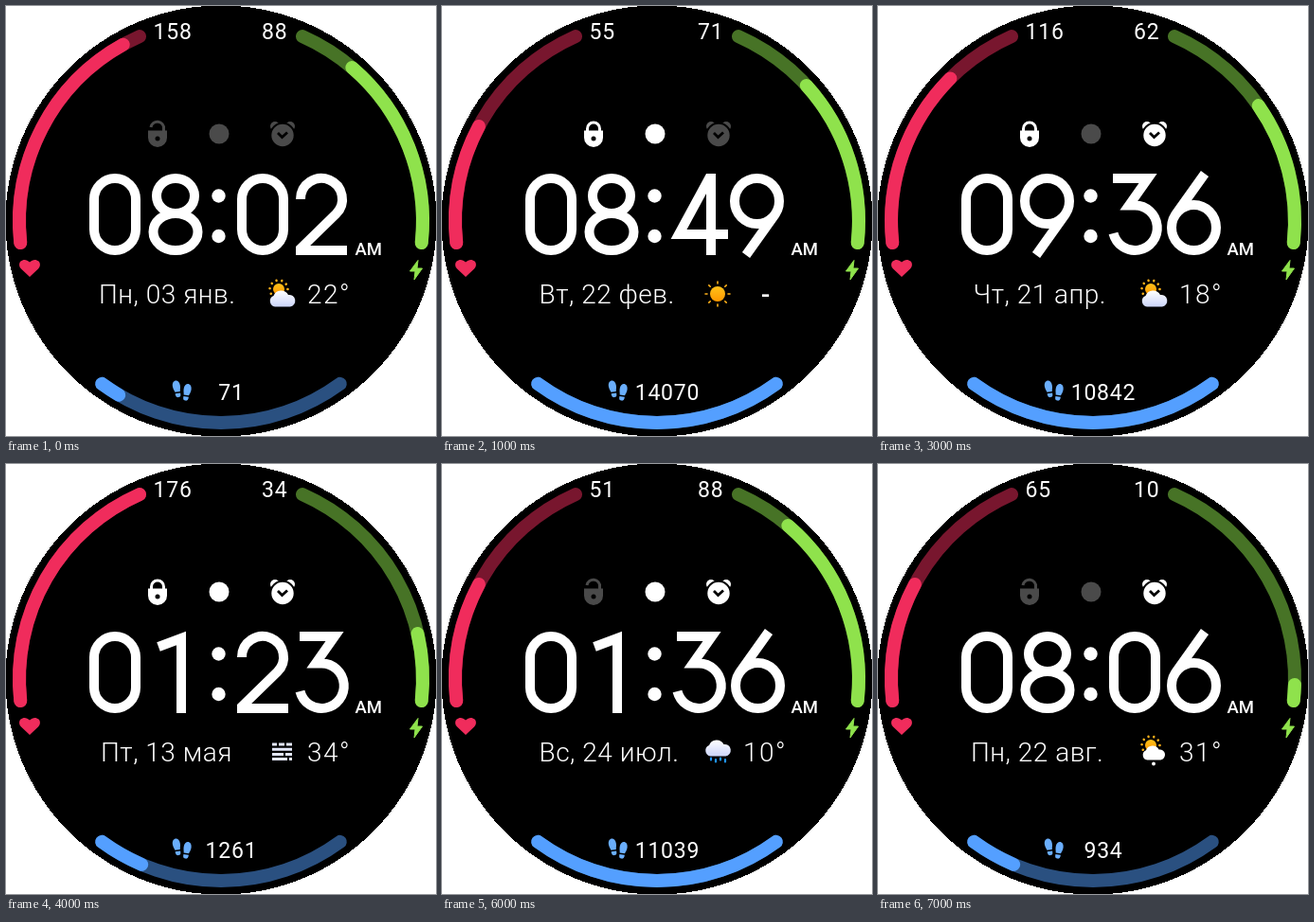
An HTML page for the animation above (8000 ms loop, 454 by 454 pixels).

```html
<!DOCTYPE html>
<html lang="ru">
<head>
<meta charset="utf-8">
<title>Watch face</title>
<style>
html, body { margin: 0; width: 100%; height: 100%; overflow: hidden; background: #fff; }
svg { display: block; width: 100vw; height: 100vh; }
text { font-family: Roboto, "Noto Sans", sans-serif; fill: #fff; white-space: pre; }
.num { font-size: 23px; letter-spacing: .8px; }
.row { font-size: 28px; font-weight: 300; letter-spacing: .5px; }
#temp { letter-spacing: 1.5px; }
.arc { fill: none; stroke-width: 14; stroke-linecap: round; }
.digit { fill: none; stroke: #fff; stroke-width: 10; }
</style>
</head>
<body>
<svg viewBox="0 0 454 454">
  <defs>
    <linearGradient id="sunFill" x1="0" y1="0" x2="0" y2="1">
      <stop offset="0" stop-color="#ffc21a"/><stop offset="1" stop-color="#ff9800"/>
    </linearGradient>
    <linearGradient id="cloudFill" x1="0" y1="0" x2="0" y2="1">
      <stop offset="0" stop-color="#fff"/><stop offset="1" stop-color="#ccd5fa"/>
    </linearGradient>
  </defs>
  <circle cx="227" cy="227" r="227.6" shape-rendering="crispEdges"/>
  <g id="arcs"></g>

  <path fill="#f02c5c" d="M25 286L16 277.500C13.500 275 13.500 271.500 15.500 269.500C18.500 267 22 267.500 25 270.500C28 267.500 31.500 267 34.500 269.500C36.500 271.500 36.500 275 34 277.500Z"/>
  <path fill="#8fe24c" stroke="#8fe24c" stroke-linejoin="round" d="M435 268.500L426.500 280H432L431 289L439.500 277H434Z"/>
  <g fill="#6aaefc">
    <g id="foot" transform="rotate(-9 180.500 405)">
      <path d="M176.500 401C176.500 393.500 184.500 393.500 184.500 401C184.500 404 183.500 406 183.500 407.500H178C178 406 176.500 404 176.500 401Z"/>
      <path d="M178 409H183.500V410.500A2.750 2.750 0 0 1 178 410.500Z"/>
    </g>
    <use href="#foot" transform="matrix(-1 0 0 1 371.500 3.500)"/>
  </g>

  <g id="lock">
    <path d="M150 131.500H170V139A10 10 0 0 1 150 139Z"/>
    <path id="shackle" fill="none" stroke-width="3"/>
    <circle cx="160" cy="140" r="2.500" fill="#000"/>
  </g>
  <circle id="link" cx="225" cy="135" r="10.500"/>
  <g id="alarm">
    <circle cx="284" cy="127" r="5"/><circle cx="300" cy="127" r="5"/>
    <circle cx="292" cy="136.500" r="12.700" stroke="#000" stroke-width="2"/>
    <path d="M287 134L291.500 138.500L297 133.500" fill="none" stroke="#000" stroke-width="2.800"/>
  </g>

  <g id="time"></g>
  <circle cx="224.500" cy="200.500" r="7.200" fill="#fff"/>
  <circle cx="224.500" cy="243" r="7.200" fill="#fff"/>
  <text x="368.500" y="263" font-size="18.500" font-weight="500">AM</text>

  <text id="date" class="row" y="314"></text>
  <g id="sky"></g>
  <text id="temp" class="row" y="314"></text>
  <text id="pulse" class="num" x="155.500" y="35"></text>
  <text id="battery" class="num" x="270" y="35"></text>
  <text id="steps" class="num" x="238" y="416" text-anchor="middle"></text>
</svg>
<script>
const $ = id => document.getElementById(id);
const STEP = 1000;

// Each row is one second of the loop.
const keys = ['time', 'x', 'date', 'sky', 'temp', 'pulse', 'heart', 'battery', 'steps', 'walk', 'lock', 'link', 'alarm'];
const states = [
  ['0802', 98, 'Пн, 03 янв.', 'partly', '22°', 158, 241, 88, 71, 0.08, 0, 0, 0],
  ['0849', 102.5, 'Вт, 22 фев.', 'sun', '-', 55, 208, 71, 14070, 1, 1, 1, 0],
  ['0422', 100.5, 'Ср, 23 мар.', 'rain', '22°', 63, 208, 34, 1849, 0.18, 0, 0, 1],
  ['0936', 100.5, 'Чт, 21 апр.', 'partly', '18°', 116, 225, 62, 10842, 1, 1, 0, 1],
  ['0123', 100, 'Пт, 13 мая', 'fog', '34°', 176, 246.2, 34, 1261, 0.18, 1, 1, 1],
  ['0248', 100.5, 'Сб, 18 июн.', 'sun', '26°', 172, 246.2, 45, 12480, 1, 1, 0, 0],
  ['0136', 102.5, 'Вс, 24 июл.', 'rain', '10°', 51, 208, 88, 11039, 1, 0, 1, 1],
  ['0806', 98, 'Пн, 22 авг.', 'sleet', '31°', 65, 208, 10, 934, 0.18, 0, 0, 1]
].map(row => Object.fromEntries(keys.map((k, i) => [k, row[i]])));

// Numerals, drawn around x = 0 with a height of 86.
const six = 'M24 57A23.500 24 0 1 1 -23 57A23.500 24 0 1 1 24 57M12 0L-19 43.500';
const digits = {
  0: 'M-22 27A22 22 0 0 1 22 27V59A22 22 0 0 1 -22 59Z',
  1: 'M6 86V7L-18 16',
  2: 'M-22 27A22 22 0 1 1 15.500 42.500L-22 79V81H27',
  3: 'M-23 5H14L-6 33.500H0A23.500 23.750 0 1 1 -22.500 63',
  4: 'M13 86V5H11L-21 64H31',
  6: six,
  8: 'M0 5A20 18.500 0 0 1 0 42A20 18.500 0 0 1 0 5M0 42A23.500 19.500 0 0 1 0 81A23.500 19.500 0 0 1 0 42',
  9: six
};
const centers = [115, 179, 271, 333];
const drawDigit = (d, i) =>
  `<path class="digit" d="${digits[d]}" transform="translate(${centers[i]} 177)${d === '9' ? ' rotate(180 0 43)' : ''}"/>`;

const point = (angle, r, cx = 227, cy = 227) => {
  const a = angle * Math.PI / 180;
  return `${(cx + r * Math.cos(a)).toFixed(2)} ${(cy + r * Math.sin(a)).toFixed(2)}`;
};
const arc = (from, to, color) =>
  `<path class="arc" stroke="${color}" d="M${point(from, 213)}A213 213 0 0 ${to > from ? 1 : 0} ${point(to, 213)}"/>`;
const gauge = (from, end, to, dim, color) => arc(from, end, dim) + arc(from, to, color);

const rays = (cx, cy, r1, r2, from, to, step, width) => {
  let d = '';
  for (let a = from; a <= to; a += step) d += `M${point(a, r1, cx, cy)}L${point(a, r2, cx, cy)}`;
  return `<path d="${d}" stroke="#ffb21a" stroke-width="${width}" stroke-linecap="round"/>`;
};
const disc = (x, y, r) => `<circle cx="${x}" cy="${y}" r="${r}" fill="url(#sunFill)"/>`;
const cloud = (x, y, k, fill = 'url(#cloudFill)') =>
  `<path transform="translate(${x} ${y}) scale(${k})" fill="${fill}" d="M6 17A6 6 0 0 1 4.500 5.500A8.500 8.500 0 0 1 20 4.500A6.300 6.300 0 0 1 22 17Z"/>`;
const sunUp = (x, y) => disc(x, y, 6) + rays(x, y, 9.3, 9.6, 150, 360, 35, 2.4);

const skies = {
  partly: () => sunUp(288, 299) + cloud(278, 300.5, 1),
  sun: () => disc(291, 304, 8) + rays(291, 304, 11, 13, 0, 330, 45, 1.6),
  rain: () => cloud(277.5, 291.5, 1) +
    '<path d="M284 310.500V312.500M289 312V314.500M294 310.500V312.500M299 312V314.500" stroke="#1f94f5" stroke-width="2.200" stroke-linecap="round"/>',
  fog: () => '<path d="M281 296H286M288 296H294M296 296H302M281 301.200H302M281 306.400H293M295 306.400H302M281 311.600H297M299 311.600H302" stroke="#e4e8fc" stroke-width="3"/>',
  sleet: () => sunUp(288, 297) + cloud(279, 297.5, 0.88, '#fff') + '<circle cx="291" cy="316.500" r="1.900" fill="#fff"/>'
};

const tint = (id, on) => {
  const color = on ? '#fff' : '#4a4a4a';
  $(id).setAttribute('fill', color);
  return color;
};

function show(s) {
  for (const id of ['date', 'temp', 'pulse', 'battery', 'steps']) $(id).textContent = s[id];
  $('date').setAttribute('x', s.x);
  $('temp').setAttribute('x', s.temp === '-' ? 337 : 318);
  $('temp').style.fontWeight = s.temp === '-' ? 500 : 300;
  $('time').innerHTML = [...s.time].map(drawDigit).join('');
  $('sky').innerHTML = skies[s.sky]();
  $('arcs').innerHTML =
    gauge(173.8, 246.2, s.heart, '#78162e', '#f02c5c') +
    gauge(6.2, -66.2, 8.9 - 7.3 * Math.floor(s.battery / 10), '#477326', '#8fe24c') +
    gauge(126.2, 53.8, 126.2 - 72.4 * s.walk, '#2a5080', '#549fff');
  $('shackle').setAttribute('stroke', tint('lock', s.lock));
  $('shackle').setAttribute('d', s.lock
    ? 'M153.500 133V129.500A6.500 6.500 0 0 1 166.500 129.500V133'
    : 'M153 128A6.700 6.500 0 0 1 166.500 129.500V133');
  tint('link', s.link);
  tint('alarm', s.alarm);
}

let current = -1;
function tick() {
  const i = Math.floor(performance.now() / STEP) % states.length;
  if (i !== current) show(states[current = i]);
  requestAnimationFrame(tick);
}
tick();
</script>
</body>
</html>
```
